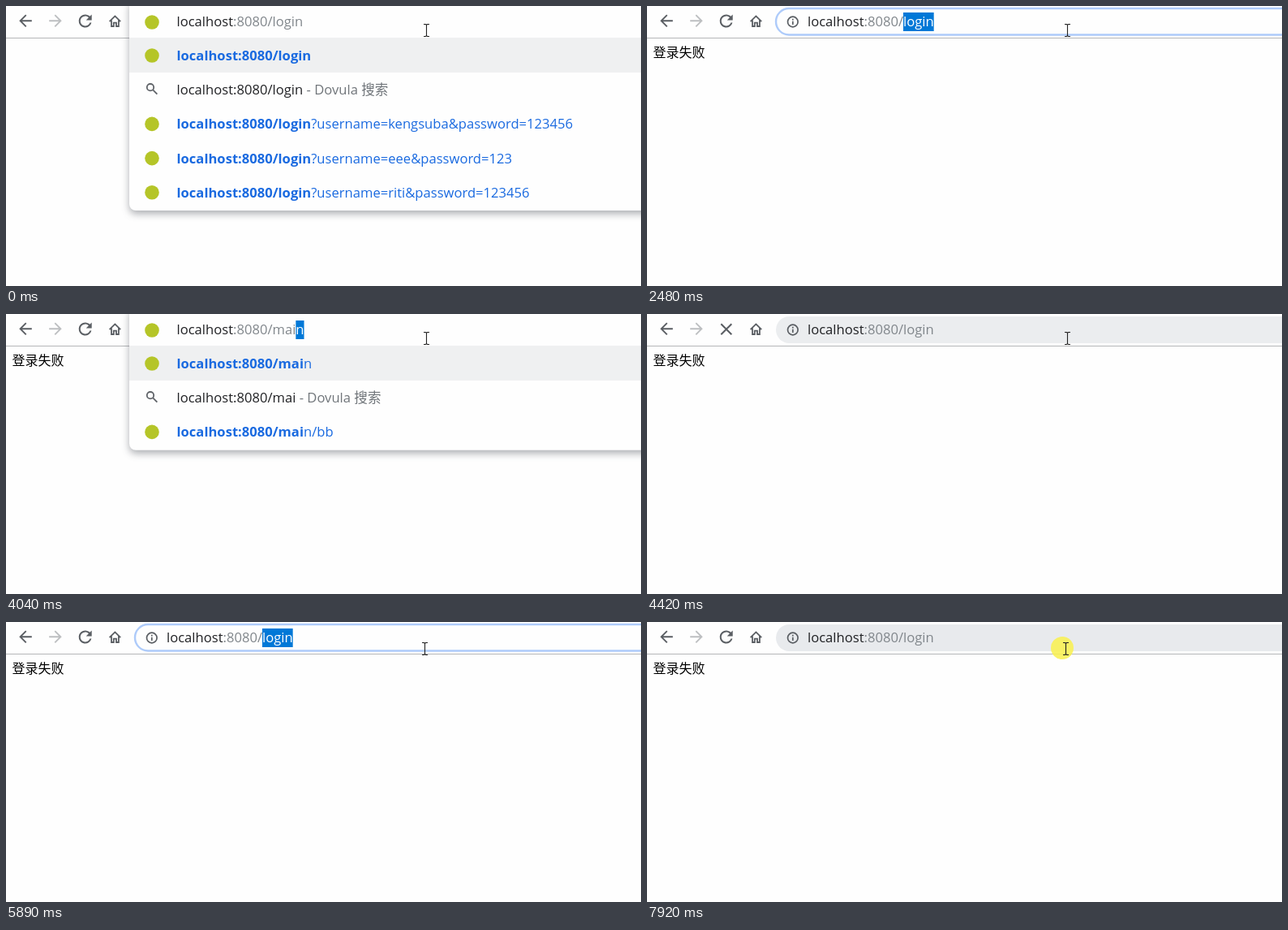
Write an HTML page that moves like this. It is 783 by 345 pixels and loops after 8 s.

```html
<!DOCTYPE html>
<html lang="zh-CN">
<head>
<meta charset="utf-8">
<title>Login check</title>
<style>
  html, body { margin: 0; width: 100%; height: 100%; overflow: hidden; background: #fefefe; }
  svg { display: block; }
  text { font: 16.6px "Open Sans", "Noto Sans CJK SC", "Noto Sans CJK", sans-serif; white-space: pre; }
  .page { font: 16px "Noto Sans CJK SC", "Noto Sans CJK", sans-serif; }
  .bold { font-weight: 700; }
  .panel { filter: drop-shadow(0 4px 5px rgba(50, 55, 65, .4)); }
</style>
</head>
<body>
<svg id="stage" width="783" height="345" viewBox="0 0 783 345">
  <rect width="783" height="345" fill="#fefefe"/>
  <path d="M0 39.5H783" stroke="#b5b6b8"/>
  <path transform="translate(12.4 6.6) scale(.97)" fill="#5a5e63" d="M20 11H7.8l5.6-5.6L12 4l-8 8 8 8 1.4-1.4L7.8 13H20z"/>
  <path transform="translate(72.6 6.6) scale(-.97 .97)" fill="#bdbfc1" d="M20 11H7.8l5.6-5.6L12 4l-8 8 8 8 1.4-1.4L7.8 13H20z"/>
  <path d="M127.6 19.2L134.4 12.4L141.2 19.2M130 17.5V25H132.8V20.6H136V25H138.9V17.5" fill="none" stroke="#5a5e63" stroke-width="1.8"/>
  <g id="view"></g>
</svg>
<script>
const LOOP = 8000;
const HOST = "localhost", BASE = "localhost:8080/";
const INK = "#202124", GREY = "#80868b", BLUE = "#1a6ae0", ICON = "#5a5e63";
const view = document.getElementById("view");
const pen = document.createElement("canvas").getContext("2d");

const esc = s => s.replace(/&/g, "&amp;");
const span = (s, fill, cls = "") => s ? `<tspan fill="${fill}" class="${cls}">${esc(s)}</tspan>` : "";
const line = (x, y, body) => `<text x="${x}" y="${y}">${body}</text>`;
const badge = y => `<circle cx="180" cy="${y}" r="8.8" fill="#b5c528"/>`;

function widthOf(s) {
  pen.font = '16.6px "Open Sans", sans-serif';
  return pen.measureText(s).width;
}

const reloadIcon = `<path transform="translate(85.7 6.5)" fill="${ICON}" d="M17.65 6.35C16.2 4.9 14.2 4 12 4a8 8 0 1 0 7.73 10h-2.08A6 6 0 1 1 12 6c1.66 0 3.14.69 4.22 1.78L13 11h7V4z"/>`;
const stopIcon = `<path d="M91.3 12.3L104.3 25.3M104.3 12.3L91.3 25.3" stroke="${ICON}" stroke-width="2"/>`;
const infoIcon = `<g stroke="${ICON}" fill="none" stroke-width="1.7"><circle cx="179.8" cy="19.5" r="6.3"/><path d="M179.8 18.7V23M179.8 15.8V17.4"/></g>`;
const searchIcon = y => `<g stroke="#5f6368" fill="none" stroke-width="1.8"><circle cx="178" cy="${y - 2}" r="4.2"/><path d="M181.2 ${y + 1.2}L186.4 ${y + 6.4}"/></g>`;

// Address text, with everything from index `from` to the end shown as selected.
function address(x, url, from, caret) {
  const cut = from ?? url.length;
  const end = x + widthOf(url);
  let out = "";
  if (cut < url.length) {
    const left = x + widthOf(url.slice(0, cut));
    out += `<rect x="${left}" y="8" width="${end - left}" height="23" fill="#0078d7"/>`;
  }
  const plain = url.slice(0, cut);
  out += line(x, 25, span(plain.slice(0, HOST.length), INK) +
    span(plain.slice(HOST.length), GREY) + span(url.slice(cut), "#fff"));
  if (caret) out += `<rect x="${Math.round(end)}" y="8" width="1.3" height="21" fill="#111"/>`;
  return out;
}

function bar(s) {
  const shape = s.focus
    ? `<rect x="159" y="3" width="660" height="32.5" rx="16.2" fill="${s.fill}" stroke="#aecbfa" stroke-width="2.4"/>`
    : `<rect x="159" y="3" width="660" height="33" rx="16.5" fill="${s.fill}"/>`;
  return shape + infoIcon + address(198, BASE + "login", s.from);
}

function suggestions(s) {
  const typed = BASE + s.typed;
  const rows = [s.rows[0], null, ...s.rows.slice(1)];
  const bottom = 41.5 + 42.1 * rows.length;
  let out = `<rect class="panel" x="152" y="-8" width="660" height="${bottom + 8}" rx="8" fill="#fefefe"/>` +
    `<rect x="152" y="39" width="631" height="43" fill="#eff0f1"/>`;
  rows.forEach((row, i) => {
    const y = 61 + 42.2 * i;
    if (row === null) {
      out += searchIcon(y - 1) + line(210.5, y + 6, span(typed, INK) + span(" - Dovula 搜索", "#70757a"));
    } else {
      out += badge(y) + line(210.5, y + 6, span(typed, BLUE, "bold") + span(row.slice(s.typed.length), BLUE));
    }
  });
  return `<g opacity="${s.fade}">${out}</g>` +
    `<path d="M152 39V6Q152 0 158 0H783V39Z" fill="#fefefe"/>` + badge(20) +
    address(210.5, BASE + (s.hint || s.typed), s.hint ? typed.length : undefined, s.caret);
}

function pointer(x, y, glow) {
  const halo = glow ? `<circle cx="${x - 4}" cy="${y - 1}" r="14" fill="#f8f052" opacity=".88"/>` : "";
  return halo + `<path transform="translate(${x + .5} ${y})" d="M-3.5 -7.5H-1L0 -6.5L1 -7.5H3.5M0 -6.5V6.5M-3.5 7.5H-1L0 6.5L1 7.5H3.5" fill="none" stroke="#222" stroke-width="1.1"/>`;
}

const list = (typed, rows, more) => ({ typed, rows, fade: 1, hint: "", caret: false, ...more });
const closed = (fill, more) => ({ rows: null, focus: false, from: undefined, glow: false, fill, ...more });

const logins = ["login", "login?username=kengsuba&password=123456",
  "login?username=eee&password=123", "login?username=riti&password=123456"];
const mains = ["main", "manager", "main/bb", "mian"];
const short = ["main", "main/bb"];

// Each step changes only the properties it names.
const steps = [
  [0, list("login", logins, { page: false, busy: false, x: 518, y: 30, glow: false })],
  [300, { caret: true }],
  [610, closed("#f3f4f5", { busy: true })],
  [690, { fill: "#edeff1" }],
  [770, { fill: "#e8eaed", page: true }],
  [930, { busy: false }],
  [1930, { focus: true, fill: "#fefefe", glow: true }],
  [2080, { from: 0, glow: false }],
  [2310, { from: BASE.length, glow: true }],
  [2480, { glow: false }],
  [3810, list("m", mains, { hint: "main", fade: .62 })],
  [3870, { fade: 1 }],
  [3950, list("ma", mains.slice(0, 3), { hint: "main" })],
  [4030, list("mai", short, { hint: "main" })],
  [4100, list("main", short, { caret: true })],
  [4420, closed("#ebedef", { busy: true })],
  [4570, { busy: false }],
  [5350, { focus: true, fill: "#f6f7f8", glow: true }],
  [5430, { fill: "#fefefe" }],
  [5660, { from: 0, glow: false }],
  [5740, { from: BASE.length, glow: true }],
  [5890, { glow: false, x: 516, y: 33 }],
  [6520, list("a", ["a", "add", "admin/list"], { fade: .3, caret: true })],
  [6600, list("as", ["as"], { caret: true })],
  [6680, list("asd", ["asd"], { caret: true })],
  [6820, list("asdf", ["asdf"], { caret: true })],
  [6980, closed("#e8eaed", { busy: true })],
  [7130, { busy: false }],
  [7920, { glow: true }]
];

let state = {};
const scenes = steps.map(([at, change]) => ({ at, ...(state = { ...state, ...change }) }));

function draw(s) {
  view.innerHTML =
    (s.page ? `<text class="page" x="7.6" y="63" fill="#000">登录失败</text>` : "") +
    (s.busy ? stopIcon : reloadIcon) +
    (s.rows ? suggestions(s) : bar(s)) +
    pointer(s.x, s.y, s.glow);
}

const start = performance.now();
let shown = null;
function tick() {
  const t = (performance.now() - start) % LOOP;
  const scene = scenes.filter(s => s.at <= t).pop();
  if (scene !== shown) draw(shown = scene);
  requestAnimationFrame(tick);
}
tick();
</script>
</body>
</html>
```
